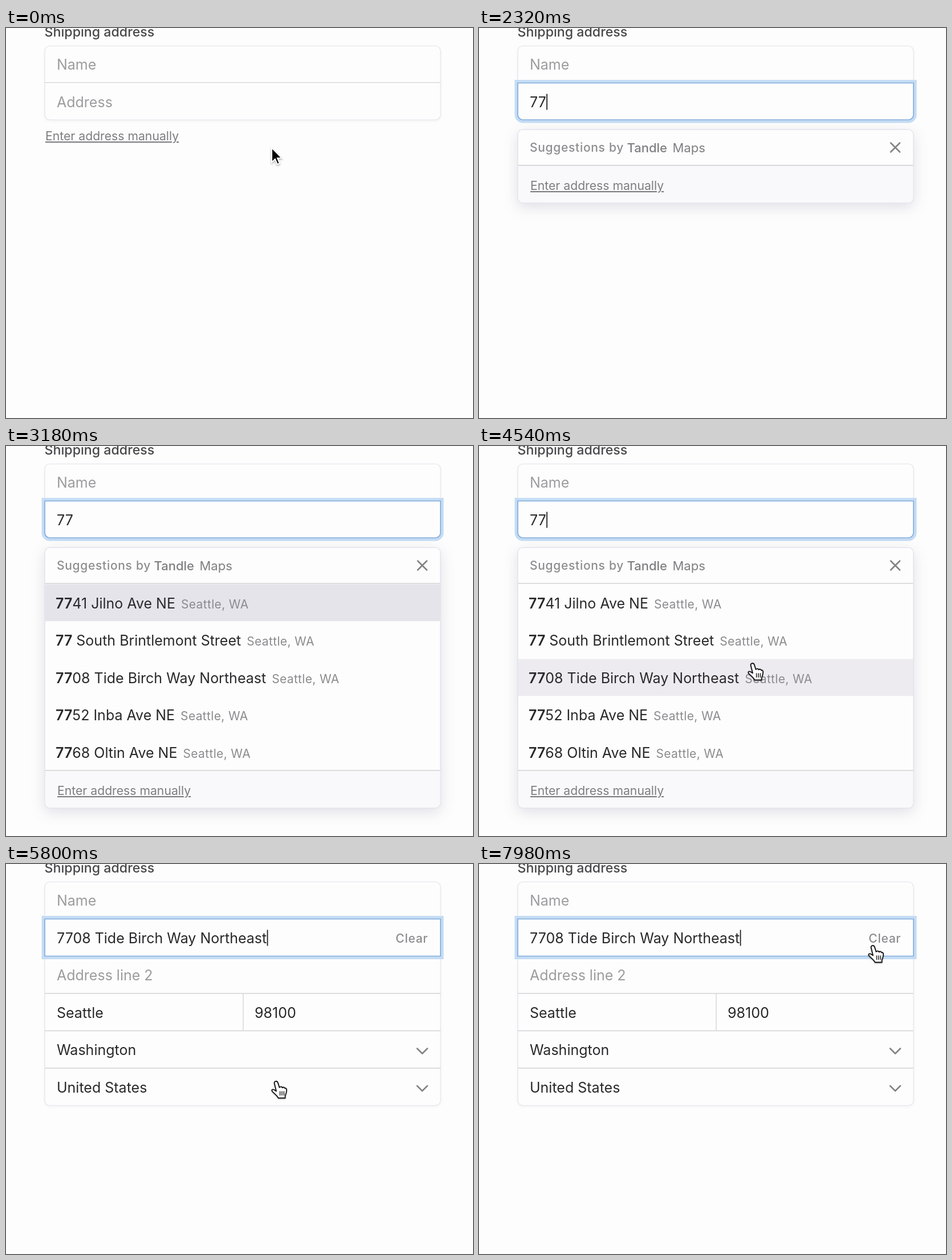
An HTML page that plays this animation: 819 px wide and 684 px high, repeating every 8000 ms.

```html
<!DOCTYPE html>
<html lang="en">
<head>
<meta charset="utf-8">
<title>Shipping address form</title>
<style>
  html, body { margin: 0; width: 100%; height: 100%; overflow: hidden; background: #fdfdfd; }
  svg { display: block; width: 100%; height: 100%; }
  text { font-family: Inter, "Open Sans", sans-serif; font-size: 25px; fill: #29292b; white-space: pre; }
  .label { font-size: 23.2px; font-weight: 500; fill: #48484a; }
  .hint { fill: #9c9c9f; }
  .link { font-size: 21.2px; fill: #7d7d80; text-decoration: underline; text-decoration-thickness: 1.4px; text-underline-offset: 3px; }
  .small { font-size: 21px; fill: #8b8b8e; letter-spacing: .35px; }
  .medium { font-size: 21px; font-weight: 500; fill: #8d8d90; letter-spacing: .7px; }
  .brand { font-size: 22px; font-weight: 500; fill: #7f7f82; }
  .plain { font-size: 22px; fill: #7f7f82; }
  .bold { font-weight: 600; }
  .line { stroke: #d3d3d6; stroke-width: 1.3; fill: none; }
  .icon { stroke: #828284; stroke-width: 2.5; fill: none; stroke-linecap: round; stroke-linejoin: round; }
  .card { fill: #fdfdfd; stroke: #e4e4ee; stroke-width: 1.2; }
  .soft { filter: drop-shadow(0 2px 2px rgba(70, 70, 90, .06)); }
  .raised { filter: drop-shadow(0 7px 12px rgba(60, 55, 100, .15)); }
</style>
</head>
<body>
<svg id="stage" viewBox="0 0 819 684" preserveAspectRatio="none"></svg>
<script>
const LOOP = 8000, PITCH = 65.6, LEFT = 89;
const FOCUS = 1100, KEY1 = 1950, OPEN = 2090, KEY2 = 2200, LIST = 2600, BLUR = 5370, PICK = 5650;
const STREET = "7708 Tide Birch Way Northeast";
const ROWS = ["41 Jilno Ave NE", " South Brintlemont Street", STREET.slice(2), "52 Inba Ave NE", "68 Oltin Ave NE"];
// Highlighted row, time on, time off
const HOVERS = [[0, LIST, 4220], [1, 4220, 4445], [2, 4445, LOOP]];
// Pointer stops: time, x, y
const STOPS = [[0, 466, 209], [140, 466, 209], [760, 455, 128], [3650, 455, 128],
  [4540, 479, 381], [4800, 473, 381], [7120, 473, 381], [7760, 690, 143]];

const text = (x, y, s, cls = "", id = "") => `<text x="${x}" y="${y}" class="${cls}" id="${id}">${s}</text>`;
const line = d => `<path class="line" d="${d}"/>`;
const icon = d => `<path class="icon" d="${d}"/>`;
const baseline = row => 73 + row * PITCH;
const rowTop = i => 242.4 + i * PITCH;

const suggestion = (s, i) => text(87, 284.5 + i * PITCH,
  `<tspan class="bold">77</tspan>${s}<tspan class="small" dx="10">Seattle, WA</tspan>`);

const details = text(LEFT, baseline(2), "Address line 2", "hint")
  + text(LEFT, baseline(3), "Seattle") + text(436, baseline(3), "98100")
  + text(LEFT, baseline(4), "Washington") + text(LEFT, baseline(5), "United States")
  + [227, 292.5, 358].map(y => line(`M68 ${y}H762`)).join("") + line("M416 227V292.5")
  + [323.5, 389].map(y => icon(`M721 ${y}l9 9l9-9`)).join("");

document.getElementById("stage").innerHTML = `
  <defs><clipPath id="clip"><rect id="clipBox" x="67.5" y="177.5" width="695" rx="9"/></clipPath></defs>
  <rect width="819" height="684" fill="#fdfdfd"/>
  ${text(67.6, 14.5, "Shipping address", "label")}
  <rect id="form" class="card soft" x="68" y="31.5" width="694" rx="9"/>
  ${text(LEFT, baseline(0), "Name", "hint")}
  ${line("M68 95.7H762")}
  <g id="details">${details}</g>
  <g id="ring">
    <path id="glow" fill="none" stroke="#c5dcf4" stroke-width="11"/>
    <path id="border" fill="#fdfdfd" stroke="#84aedc" stroke-width="1.7"/>
  </g>
  ${text(LEFT, baseline(1), "", "", "field")}
  <rect id="caret" y="115.5" width="1.7" height="28" fill="#18181a"/>
  ${text(683.3, 138, "Clear", "medium", "clear")}
  ${text(69, 197, "Enter address manually", "link", "link")}
  <g id="popup">
    <rect id="panel" class="card raised" x="68" y="178" width="694" rx="9"/>
    <g clip-path="url(#clip)">
      ${text(LEFT, 217, "Suggestions by", "medium")}
      ${text(259.5, 217.5, "Tandle", "brand")}
      ${text(339.5, 217.5, "Maps", "plain")}
      ${icon("M722 201.5l16 16m0-16l-16 16")}
      ${line("M68 241H762")}
      <g id="rows">
        ${HOVERS.map(([i], n) => `<rect id="hover${n}" x="68" y="${rowTop(i)}" width="694" height="64.8" fill="#e6e4eb"/>`).join("")}
        ${ROWS.map(suggestion).join("")}
      </g>
      <g id="footer">
        <rect x="68" y="241" width="694" height="66" fill="#f9f9fb"/>
        ${line("M68 241H762")}
        ${text(90, 284, "Enter address manually", "link")}
      </g>
    </g>
    <rect id="edge" class="card" style="fill:none" x="68" y="178" width="694" rx="9"/>
  </g>
  <g id="pointer">
    <path id="arrow" d="M0 1V26.5L5.9 20.9L9.8 30L13.8 28.3L10 19.3L17.6 19Z" fill="#000" stroke="#fff" stroke-width="2"
      style="filter:drop-shadow(0 2px 1.5px rgba(0,0,0,.3))"/>
    <path id="beam" d="M-4-11Q0-11 0-8V8Q0 11-4 11M4-11Q0-11 0-8V8Q0 11 4 11" fill="none" stroke="#222" stroke-width="1.5"/>
    <g id="hand" stroke="#111" stroke-width="1.8" stroke-linejoin="round" stroke-linecap="round"
      style="filter:drop-shadow(0 1px 1px rgba(0,0,0,.25))">
      <path fill="#fff" d="M-2.5 3C-2-.8 2.4-1 3.8 2.6L6.5 11C8 8.8 11 9.4 11.6 11.5C13 9.8 15.8 10.4 16.2 12.6C18 11.6 19.6 13.2 19 16.5C18.8 21 17.6 23 16.6 25.5V29.5H4.5C3.4 26-1 23-5.4 18.6C-8.2 15.6-6 13.4-3 14.8L1 17.4Z"/>
      <path fill="none" stroke-width="1.4" d="M7.6 18V24.5M11 18V24.5M14.4 18V24.5"/>
    </g>
  </g>`;

const el = id => document.getElementById(id);
const show = (id, on) => el(id).style.display = on ? "" : "none";
const ramp = (t, start, len) => Math.max(0, Math.min(1, (t - start) / len));
const smooth = p => p * p * (3 - 2 * p);

function pointerAt(t) {
  let [, x, y] = STOPS[0];
  for (let i = 1; i < STOPS.length; i++) {
    const [t0] = STOPS[i - 1], [t1, x1, y1] = STOPS[i];
    const p = smooth(ramp(t, t0, t1 - t0));
    x += (x1 - x) * p;
    y += (y1 - y) * p;
  }
  return [x, y];
}

function pointerShape(t, x, y) {
  if (t < PICK) {
    if (y < 162) return "beam";
    return t > LIST && y > 242 ? "hand" : "arrow";
  }
  return y > 292 || x > 682 ? "hand" : "beam";
}

function drawField(t, picked) {
  const value = picked ? STREET : t >= KEY2 ? "77" : t >= KEY1 ? "7" : "";
  const field = el("field");
  field.textContent = value || "Address";
  field.setAttribute("class", value ? "" : "hint");

  const d = picked ? "M68 96.5H762V161.5H68Z" : "M68 96.5H762V152a9 9 0 0 1-9 9H77a9 9 0 0 1-9-9Z";
  el("glow").setAttribute("d", d);
  el("border").setAttribute("d", d);
  // The border line fades before the glow around it
  el("ring").style.opacity = picked ? ramp(t, PICK, 120) : ramp(t, FOCUS, 150) - ramp(t, BLUR + 40, 180);
  el("border").style.strokeOpacity = picked ? 1 : 1 - ramp(t, BLUR, 50);

  const focused = picked || (t >= FOCUS && t < BLUR);
  const since = [PICK, KEY2, KEY1, FOCUS].find(s => t >= s) ?? 0;
  const width = value ? field.getComputedTextLength() : 0;
  el("caret").setAttribute("x", LEFT + width + .5);
  show("caret", focused && (t - since) % 1000 < 500);
}

function drawPopup(t, picked) {
  const open = t >= OPEN && !picked;
  show("popup", open);
  show("link", !open && !picked);
  if (!open) return;
  el("popup").style.opacity = ramp(t, OPEN, 100);
  const grow = smooth(ramp(t, LIST, 120)) * PITCH * ROWS.length;
  for (const id of ["panel", "edge", "clipBox"]) el(id).setAttribute("height", 129 + grow);
  el("footer").setAttribute("transform", `translate(0 ${grow})`);
  show("rows", t >= LIST);
  HOVERS.forEach(([, on, off], n) => {
    el("hover" + n).style.opacity = t < off ? ramp(t, on, 140) : 0;
  });
}

function draw(t) {
  const picked = t >= PICK;
  el("form").setAttribute("height", picked ? 392 : 129.5);
  show("details", picked);
  show("clear", picked);
  drawField(t, picked);
  drawPopup(t, picked);

  const [x, y] = pointerAt(t), shape = pointerShape(t, x, y);
  for (const id of ["arrow", "beam", "hand"]) show(id, id === shape);
  el("pointer").setAttribute("transform", `translate(${x} ${y})`);
  show("pointer", t < KEY1 || t >= 3650);
}

const start = performance.now();
function tick(now) {
  draw(Math.max(0, now - start) % LOOP);
  requestAnimationFrame(tick);
}
draw(0);
requestAnimationFrame(tick);
</script>
</body>
</html>
```
